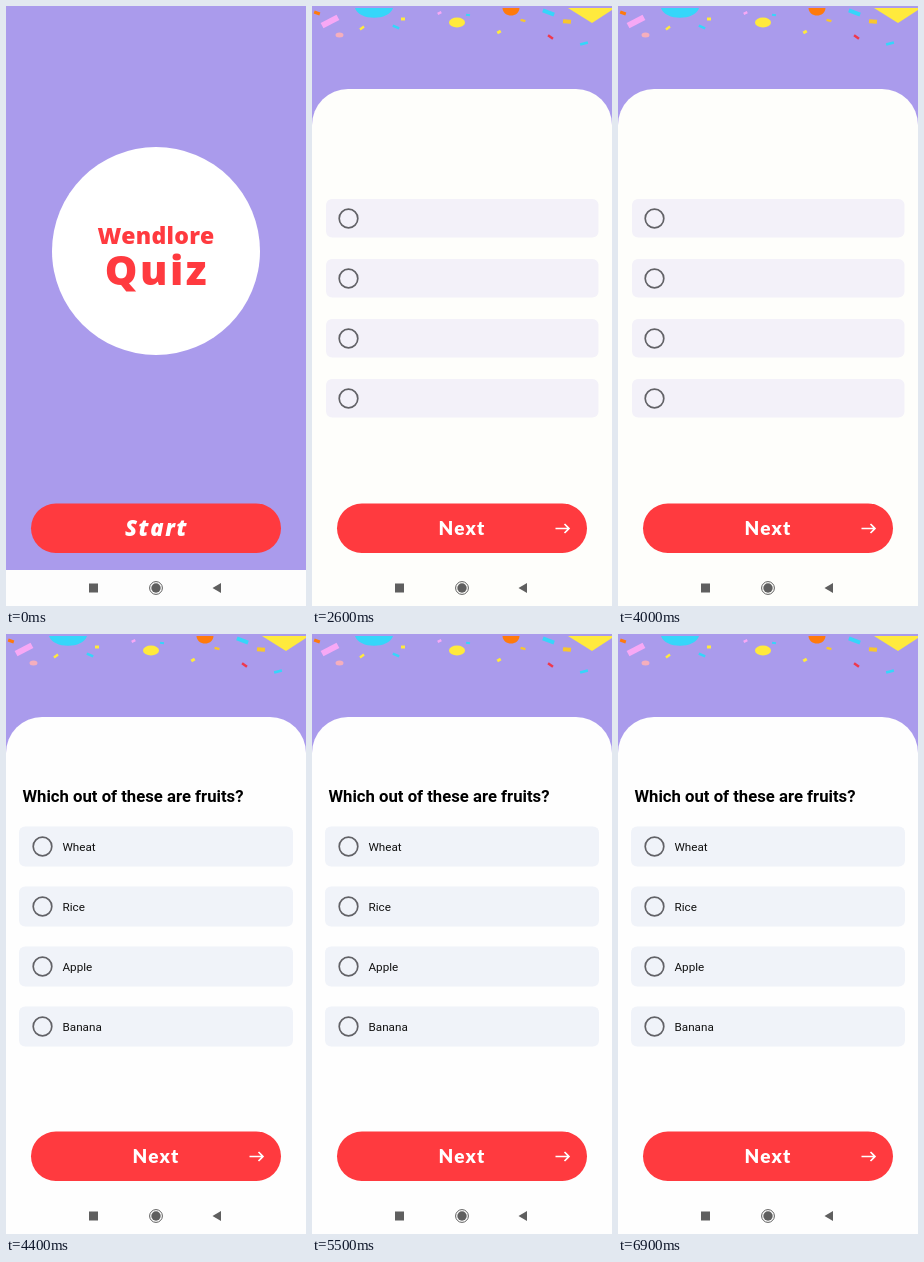
Animation, 300 px wide and 600 px high, one loop 8300 ms. Source, as an HTML page:

```html
<!DOCTYPE html>
<html lang="en">
<head>
<meta charset="utf-8">
<title>Quiz</title>
<style>
  html, body { margin: 0; width: 100%; height: 100%; overflow: hidden; }
  svg { display: block; width: 300px; height: 600px; }
  .title { font: 800 23px "Open Sans", sans-serif; letter-spacing: .3px; fill: #ff3a3f; }
  .quiz { font: 800 41px "Open Sans", sans-serif; letter-spacing: 2.5px; fill: #ff3a3f; }
  .start { font: italic 800 22px "Open Sans", sans-serif; letter-spacing: 1.6px; fill: #fff; }
  .next { font: 900 19px Lato, sans-serif; letter-spacing: 1.2px; fill: #fff; }
  .question { font: 700 16.7px Roboto, sans-serif; }
  .option { font: 400 11.7px Roboto, sans-serif; fill: #111; }
  .mid { text-anchor: middle; }
</style>
</head>
<body>
<svg viewBox="0 0 300 600">
  <rect width="300" height="600" fill="#aa9bec"/>

  <g id="welcome">
    <circle cx="150" cy="245" r="104" fill="#fff"/>
    <text class="title mid" x="150" y="238">Wendlore</text>
    <text class="quiz mid" x="151" y="279">Quiz</text>
    <rect y="564" width="300" height="36" fill="#fdfdfd"/>
  </g>

  <g id="question">
    <g id="confetti"></g>
    <path id="panel" d="M0 600V119a36 36 0 0 1 36-36H264a36 36 0 0 1 36 36V600z"/>
    <g id="cards"></g>
    <text class="question" id="prompt" x="16.5" y="168">Which out of these are fruits?</text>
  </g>

  <rect x="25" y="497.5" width="250" height="49.5" rx="24.75" fill="#ff3a3f"/>
  <text class="start mid" id="start" x="150.500" y="530">Start</text>
  <g id="next">
    <text class="next mid" x="150" y="529">Next</text>
    <path d="M243.500 522.500H257M252.500 518l4.500 4.500-4.500 4.500" fill="none" stroke="#fff" stroke-width="1.6"/>
  </g>

  <g fill="#5f5f5f">
    <rect x="83" y="577.500" width="9" height="9"/>
    <circle cx="150" cy="582" r="4.700"/>
    <circle cx="150" cy="582" r="6.400" fill="none" stroke="#5f5f5f"/>
    <path d="M206.500 582l8.500-5v10z"/>
  </g>
</svg>
<script>
const LOOP = 8300, QUESTION_AT = 2600, TEXT_AT = 4200;
const $ = id => document.getElementById(id);

const cyan = '#35d6fa', yellow = '#ffea3d', orange = '#ff7a0c',
      pink = '#f7a8f5', salmon = '#f5aebd', red = '#f0384c', gold = '#f8c62e';

// Slanted paper strips: x, y, width, height, angle, colour
const strips = [
  [5, 7, 6, 3, 20, orange], [18, 15.5, 18, 6, -28, pink],
  [50, 22, 5, 2.5, -35, yellow], [84, 21, 7, 2.5, 25, cyan],
  [91, 13, 4, 3, 0, yellow], [127.5, 7, 4, 2.5, -25, pink],
  [156, 9, 4, 2, 10, cyan], [187, 26, 4, 3, -30, yellow],
  [211, 14.5, 5, 2.5, 15, gold], [236.5, 6.5, 12, 4, 20, cyan],
  [255, 15.5, 8, 4, 5, gold], [238.5, 31, 6, 2.5, 35, red],
  [272, 37.5, 8, 2.5, -15, cyan]
];
$('confetti').innerHTML = strips.map(([x, y, w, h, angle, color]) =>
  `<rect x="${-w / 2}" y="${-h / 2}" width="${w}" height="${h}" fill="${color}"
    transform="translate(${x} ${y}) rotate(${angle})"/>`).join('') + `
  <path d="M43 2H81C77 15 47 15 43 2z" fill="${cyan}"/>
  <path d="M190.500 2H207.500C207 12 191 12 190.500 2z" fill="${orange}"/>
  <path d="M256 2H300V4L280 17z" fill="${yellow}"/>
  <ellipse cx="145" cy="16.500" rx="8" ry="5" fill="${yellow}"/>
  <ellipse cx="27.500" cy="29" rx="4" ry="2.500" fill="${salmon}"/>`;

$('cards').innerHTML = ['Wheat', 'Rice', 'Apple', 'Banana'].map((label, i) => `
  <g transform="translate(0 ${i * 60})">
    <rect class="card" rx="6"/>
    <circle cx="36.500" cy="212.500" r="9.300" fill="none" stroke="#626267" stroke-width="1.700"/>
    <text class="option" x="56.500" y="217">${label}</text>
  </g>`).join('');

const show = (el, on) => el.style.display = on ? '' : 'none';
const cards = document.querySelectorAll('.card');
const labels = [$('prompt'), ...document.querySelectorAll('.option')];

function draw() {
  const t = performance.now() % LOOP;
  const quiz = t >= QUESTION_AT, loaded = t >= TEXT_AT;
  show($('welcome'), !quiz);
  show($('start'), !quiz);
  show($('question'), quiz);
  show($('next'), quiz);
  labels.forEach(el => show(el, loaded));
  $('panel').setAttribute('fill', loaded ? '#fefefe' : '#fefefb');
  const box = loaded
    ? { x: 13, y: 192.5, width: 274, height: 40, fill: '#f0f3f9' }
    : { x: 14, y: 193, width: 272.5, height: 38.5, fill: '#f3f1f9' };
  for (const card of cards)
    for (const key in box) card.setAttribute(key, box[key]);
  requestAnimationFrame(draw);
}
draw();
</script>
</body>
</html>
```
